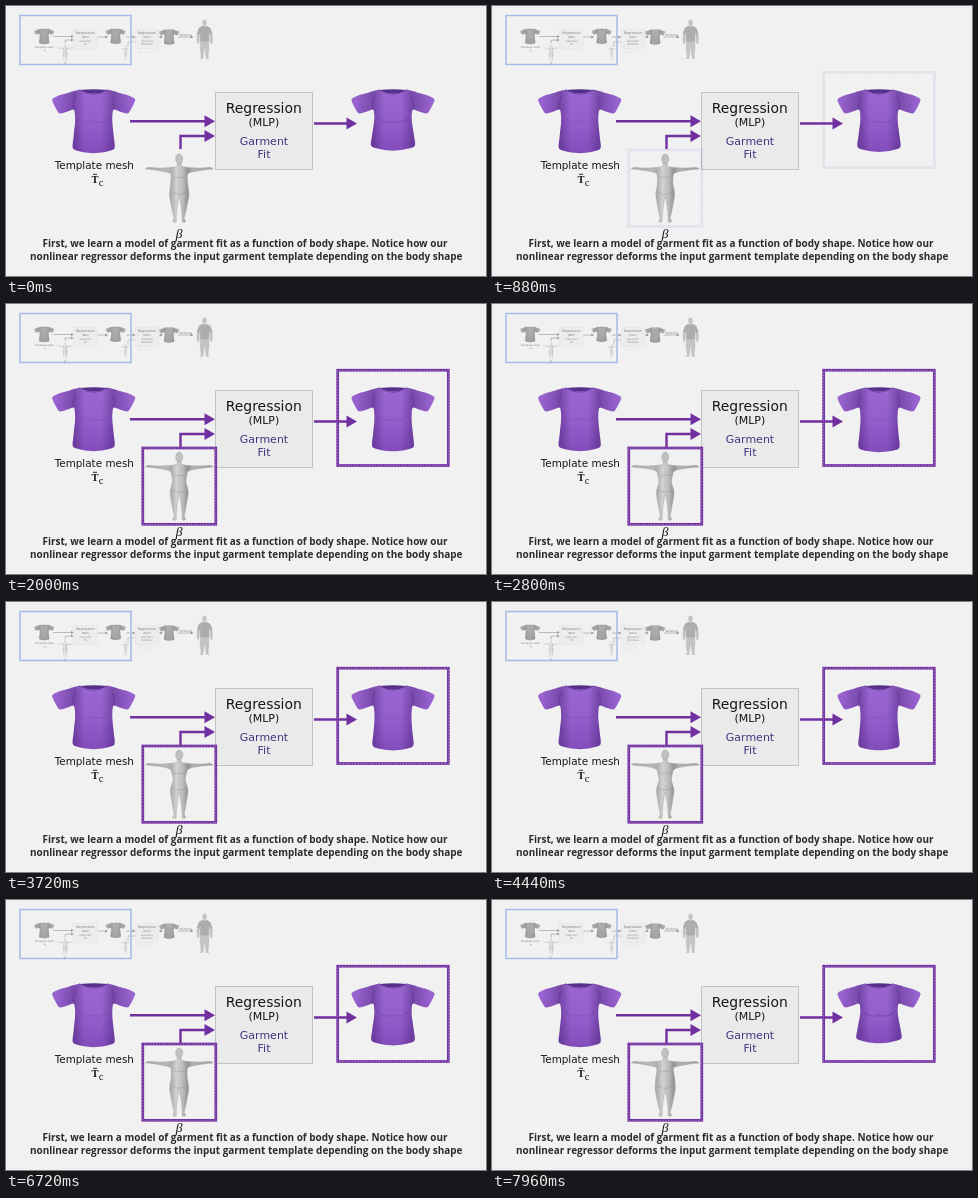
Recreate the animation shown at these times as an HTML page. Size 480 by 270 pixels, loop 8000 ms.

```html
<!DOCTYPE html>
<html lang="en">
<head>
<meta charset="utf-8">
<title>Garment fit regression</title>
<style>
  html, body { margin: 0; width: 100%; height: 100%; overflow: hidden; background: #f1f1f1; }
  svg { display: block; width: 480px; height: 270px; }
  text { font-family: "DejaVu Sans", sans-serif; text-anchor: middle; fill: #161616; }
  .math { font-family: "Liberation Serif", serif; }
  .caption { font: bold 9.96px "Open Sans", sans-serif; fill: #2b2b2b; }
  .mini { filter: grayscale(1); opacity: .55; }
</style>
</head>
<body>
<svg viewBox="0 0 480 270">
  <defs>
    <linearGradient id="cloth" x2="0" y2="1">
      <stop stop-color="#9a66d0"/><stop offset=".5" stop-color="#945ecc"/><stop offset="1" stop-color="#824cba"/>
    </linearGradient>
    <linearGradient id="sides">
      <stop offset=".05" stop-color="#3b1766" stop-opacity="0"/>
      <stop offset=".27" stop-color="#3b1766" stop-opacity=".36"/>
      <stop offset=".39" stop-color="#3b1766" stop-opacity="0"/>
      <stop offset=".6" stop-color="#3b1766" stop-opacity="0"/>
      <stop offset=".73" stop-color="#3b1766" stop-opacity=".36"/>
      <stop offset=".95" stop-color="#3b1766" stop-opacity="0"/>
    </linearGradient>
    <linearGradient id="skin">
      <stop stop-color="#a8a8a8"/><stop offset=".3" stop-color="#bababa"/><stop offset=".38" stop-color="#adadad"/>
      <stop offset=".46" stop-color="#d2d2d2"/><stop offset=".55" stop-color="#bcbcbc"/>
      <stop offset=".63" stop-color="#929292"/><stop offset=".7" stop-color="#b2b2b2"/><stop offset="1" stop-color="#a0a0a0"/>
    </linearGradient>
  </defs>
  <g id="fixed"></g>
  <g id="live"></g>
</svg>
<script>
const PURPLE = '#7030a0';
const LOOP = 8000;
// [time in ms, body fatness]
const SHAPE_KEYS = [[0, .75], [1400, .4], [2800, .12], [3720, .08], [5240, .12], [6720, .62], [8000, 1]];
const clamp = v => Math.max(0, Math.min(1, v));

function fatnessAt(ms) {
  const i = Math.max(1, SHAPE_KEYS.findIndex(k => k[0] >= ms));
  const [t0, a] = SHAPE_KEYS[i - 1], [t1, b] = SHAPE_KEYS[i];
  return a + (b - a) * (ms - t0) / (t1 - t0);
}

// Closed curve through a right-hand outline and its mirror image.
function mirrored(half, tension) {
  const p = [...half, ...half.filter(q => q[0] > 0).reverse().map(([x, y]) => [-x, y])];
  const n = p.length, at = i => p[(i + n) % n];
  let d = `M${p[0]}`;
  for (let i = 0; i < n; i++) {
    const [a, b, c, e] = [at(i - 1), at(i), at(i + 1), at(i + 2)];
    const handle = (q, from, to, s) => q.map((v, k) => (v + s * (to[k] - from[k]) * tension).toFixed(2));
    d += `C${handle(b, a, c, 1)} ${handle(c, b, e, -1)} ${c}`;
  }
  return d + 'Z';
}

function shirt(cx, f) {
  const hem = 145.3 - 5.6 * f;
  const d = mirrored([[0, 87.5], [9, 86.5], [14, 83.7], [27, 87.3], [36, 90], [41.5, 93.5], [38.5, 101], [34.3, 107.3],
    [27, 105.8], [20, 103.5], [18.6, 110], [18.4 + f, 118], [19.2 + 2.5 * f, 130], [20 + 2.2 * f, hem - 1],
    [11, hem + 2.4], [0, hem + 3.6]], .13);
  const fold = (path, opacity) => `<path d="${path}" stroke="#432070" stroke-width="1.4" opacity="${opacity}"/>`;
  return `<g transform="translate(${cx})" fill="none" stroke-linecap="round">
    <path d="M-13.5 84Q0 82.4 13.5 84Q9 87.5 0 88Q-9 87.5-13.5 84" fill="#55308a"/>
    <path d="${d}" fill="url(#cloth)"/><path d="${d}" fill="url(#sides)"/>
    <path d="M-14 84Q-9 87.8 0 88.4Q9 87.8 14 84" stroke="#7646ad"/>
    ${fold('M-20 103Q-22 96-18 91M20 103Q22 96 18 91', .22)}
    ${fold('M-14 113Q-8 118-1 115Q8 118 14 113', .05 + .2 * f)}
  </g>`;
}

function body(cx, f) {
  const d = mirrored([[0, 157], [2, 157.5], [2.3, 160], [7, 161.3], [17, 162], [26, 161.8], [31, 161.4], [33.7, 163],
    [28, 163.5], [17, 164.8 + .6 * f], [9, 167.3], [7 + 1.5 * f, 172], [5.8 + 3.7 * f, 178], [8 + 2 * f, 185],
    [8.6 + 1.4 * f, 190], [7.2 + f, 199], [5.9 + .6 * f, 207], [5, 212], [6.4, 215.4], [3.2, 216],
    [2.9, 210], [2.2, 202], [.9, 194], [0, 190.5]], .15);
  return `<g transform="translate(${cx})" fill="none" stroke="#777">
    <path d="${d}" fill="url(#skin)" stroke="#999" stroke-width=".4"/>
    <ellipse cy="153" rx="3.5" ry="5" fill="#c0c0c0" stroke="#a0a0a0" stroke-width=".5"/>
    <path d="M-5.5 170.5Q-3 173 0 171Q3 173 5.5 170.5M-7 186Q0 ${190 + f} 7 186" opacity=".3"/>
  </g>`;
}

const label = (x, y, size, str, extra = '') => `<text x="${x}" y="${y}" font-size="${size}" ${extra}>${str}</text>`;

const arrow = (d, tipX, y) => `<path d="${d}H${tipX - 8}" fill="none" stroke="${PURPLE}" stroke-width="2.4"/>
  <path d="M${tipX} ${y}l-10.5-6v12z" fill="${PURPLE}"/>`;

const regressor = (x, kind) => `<rect x="${x}" y="86.5" width="97" height="77" fill="#eaeaea" stroke="#c2c2c2"/>
  ${label(x + 48.3, 107, 13.9, 'Regression')}${label(x + 48.3, 120.3, 11, '(MLP)')}
  ${label(x + 48.5, 139.3, 11, 'Garment', 'style="fill:#45327e"')}${label(x + 48.5, 152.4, 11, kind, 'style="fill:#45327e"')}`;

const diagram = () => `${shirt(87.7, .3)}${regressor(209.5, 'Fit')}
  ${arrow('M124 115.3', 209, 115.3)}${arrow('M174.5 143V130', 209, 130)}${arrow('M308 117.5', 351, 117.5)}
  ${label(88.3, 163.4, 10.4, 'Template mesh')}
  ${label(89, 177, 10.5, 'T', 'class="math" font-weight="bold"')}
  <path d="M87 168.3h4" stroke="#161616" stroke-width=".9"/>
  ${label(95.2, 179.6, 10.5, 'c', 'class="math"')}
  ${label(173, 231.5, 13.5, 'β', 'class="math" font-style="italic"')}`;

const overview = () => `<g class="mini">
  <g transform="translate(17 2.6) scale(.242)">
    ${diagram()}${body(174, .5)}${shirt(383, .5)}
    ${regressor(464, 'Wrinkles')}${arrow('M426 117.5', 464, 117.5)}
    <rect x="481" y="164" width="46" height="17" fill="#eee" stroke="#bbb"/>
    ${arrow('M562 117.5', 578, 117.5)}<g transform="translate(0 3)">${shirt(604, .5)}</g>
    ${arrow('M640 117.5', 704, 117.5)}${label(672, 113, 12, 'Skinning')}
  </g>
  <g transform="translate(119.5 8.5) scale(.13 .21)">${body(0, .4)}</g>
  <path d="M122 41V36H129" fill="none" stroke="#777" stroke-width=".6"/>
  <g fill="#a0a0a0" stroke="#808080" stroke-width=".3">
    <path d="M194.5 33L194 42L195.2 51L193.8 52.5H197L198.6 40L200.2 52.5H203.2L202 51L203 42L202.8 33Z"/>
    <path d="M192.5 24L190.8 31L191.5 38L193 37L194 26ZM204.8 24L206.6 31L206 38L204.4 37L203.4 26Z"/>
    <ellipse cx="198.5" cy="16.7" rx="2" ry="3"/>
  </g>
  <path d="M196.4 19.8Q198.5 21 200.6 19.8L204.4 22L206.4 28L204 29L203 26L203.2 35Q198.5 36.5 194 35L194.2 26L193.2 29L190.8 28L192.8 22Z" fill="#777"/>
  </g>
  <rect x="14" y="9.5" width="111" height="49" fill="none" stroke="#a3bbe6" stroke-width="1.5"/>`;

// Purple highlight frame with a fine dashed light line running along it.
const highlight = (x, y, w, h, ms) => {
  const rect = style => `<rect x="${x}" y="${y}" width="${w}" height="${h}" fill="none" ${style}/>`;
  return rect(`stroke="${PURPLE}" stroke-width="2.7"`) +
    rect(`stroke="#c9a9df" stroke-width=".9" stroke-dasharray="1.3 1.7" stroke-dashoffset="${-ms / 100}" opacity=".7"`);
};

document.getElementById('fixed').innerHTML = overview() + diagram() +
  label(239, 241, 10, 'First, we learn a model of garment fit as a function of body shape. Notice how our', 'class="caption"') +
  label(240.2, 254, 10, 'nonlinear regressor deforms the input garment template depending on the body shape', 'class="caption"');

const live = document.getElementById('live');
const start = performance.now();
function draw() {
  const ms = (performance.now() - start) % LOOP;
  const f = fatnessAt(ms);
  live.innerHTML = body(173.2, f) + shirt(387, f) +
    `<g opacity="${clamp((ms - 800) / 880)}">${highlight(136.8, 144, 73, 76.3, ms)}${highlight(331.7, 66.2, 110.6, 95.3, ms)}</g>`;
  requestAnimationFrame(draw);
}
draw();
</script>
</body>
</html>
```
